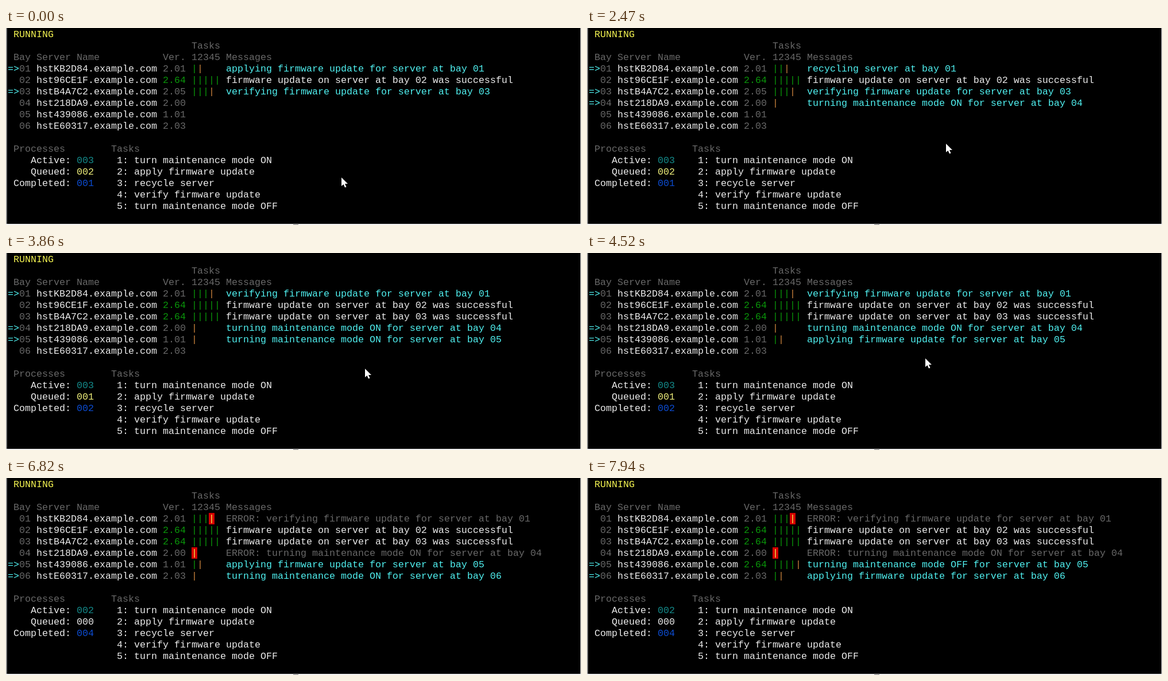
Recreate the animation shown at these times as an HTML page with a canvas. Size 1001 by 344 pixels, loop 8040 ms.

```html
<!DOCTYPE html>
<html lang="en">
<head>
<meta charset="utf-8">
<title>Firmware update monitor</title>
<style>
html, body { margin: 0; width: 100%; height: 100%; overflow: hidden; background: #000; }
canvas { display: block; }
</style>
</head>
<body>
<canvas id="screen" width="1001" height="344"></canvas>
<script>
const ctx = document.getElementById('screen').getContext('2d');
const LOOP = 8040, BLINK = 684, TICK = 130;
const GREY = '#686868', WHITE = '#ececec', CYAN = '#50f0f0', GREEN = '#0a960a',
      YELLOW = '#f2f250', ORANGE = '#c8823c', RED = '#d40000';

const tasks = ['turn maintenance mode ON', 'apply firmware update', 'recycle server',
  'verify firmware update', 'turn maintenance mode OFF'];
const doing = ['turning maintenance mode ON for', 'applying firmware update for', 'recycling',
  'verifying firmware update for', 'turning maintenance mode OFF for'];
const DONE = tasks.length + 1;

// first: stage at the start (0 = waiting); steps: when each next stage begins; fails: when it breaks
const servers = [
  { name: 'hstKB2D84', version: '2.01', first: 2, steps: [1910, 2880], fails: 6820 },
  { name: 'hst96CE1F', version: '2.03', first: DONE, steps: [] },
  { name: 'hstB4A7C2', version: '2.05', first: 4, steps: [3020, 3860] },
  { name: 'hst218DA9', version: '2.00', first: 0, steps: [2470], fails: 6550 },
  { name: 'hst439086', version: '1.01', first: 0, steps: [3860, 4000, 6940, 7530, 7790] },
  { name: 'hstE60317', version: '2.03', first: 0, steps: [6550, 7660] }
];

const pointerMoves = [
  { at: 0, lasts: 390, x: 604, y: 185 },
  { at: 650, lasts: 260, x: 625, y: 202 },
  { at: 4030, lasts: 390, x: 589, y: 184 }
];
const POINTER_GONE = 6050;

const easeOut = p => 1 - (1 - p) ** 3;

function text(col, row, str, color) {
  ctx.fillStyle = color;
  ctx.fillText(str, 3 + col * 10, 16 + row * 20);
}

function rect(x, y, w, h, color) {
  ctx.fillStyle = color;
  ctx.fillRect(x, y, w, h);
}

function statusAt(server, t) {
  return {
    stage: server.first + server.steps.filter(s => s <= t).length,
    failed: t >= server.fails
  };
}

function drawServer(server, i, { stage, failed }) {
  const row = 3 + i, bay = '0' + (i + 1);
  const done = stage === DONE, updated = stage >= 5;
  if (stage && !done && !failed) text(0, row, '=>', CYAN);
  text(2, row, bay, GREY);
  text(5, row, server.name + '.example.com', WHITE);
  text(27, row, updated ? '2.64' : server.version, updated ? GREEN : GREY);
  if (!stage) return;

  for (let n = 1; n <= Math.min(stage, tasks.length); n++) {
    const broken = failed && n === stage;
    if (broken) rect(313 + n * 10, 1 + row * 20, 10, 20, RED);
    text(31 + n, row, '|', broken ? YELLOW : n === stage ? ORANGE : GREEN);
  }
  const message = done
    ? `firmware update on server at bay ${bay} was successful`
    : `${failed ? 'ERROR: ' : ''}${doing[stage - 1]} server at bay ${bay}`;
  text(38, row, message, done ? WHITE : failed ? GREY : CYAN);
}

function drawCounters(states) {
  const completed = states.filter(s => s.failed || s.stage === DONE).length;
  const queued = Math.max(0, 3 - completed);
  const active = states.length - completed - queued;
  const counters = [
    ['Active:', active, '#148a8a'],
    ['Queued:', queued, queued ? '#f0f07c' : WHITE],
    ['Completed:', completed, '#0c4cd2']
  ];
  counters.forEach(([label, value, color], i) => {
    text(11 - label.length, 11 + i, label, WHITE);
    text(12, 11 + i, '00' + value, color);
  });
}

function drawPointer(t) {
  if (t >= POINTER_GONE) return;
  const now = Math.floor(t / TICK) * TICK;
  let x = 584, y = 261;
  for (const move of pointerMoves) {
    const p = easeOut(Math.min(1, Math.max(0, (now - move.at) / move.lasts)));
    x += (move.x - x) * p;
    y += (move.y - y) * p;
  }
  ctx.save();
  ctx.translate(Math.round(x), Math.round(y));
  ctx.fillStyle = '#fff';
  ctx.fill(new Path2D('M0 0V15L3.5 12L6 17.5L8.5 16.5L6 11H11Z'));
  ctx.restore();
}

function drawEdges() {
  rect(0, 0, 1, 344, '#a0a0a0');
  rect(1, 0, 1, 344, '#6e6e6e');
  rect(1000, 0, 1, 344, '#f0f0f0');
  rect(0, 342, 1001, 2, '#f0f0f0');
  rect(500, 343, 9, 1, '#707070');
}

function draw(t) {
  const states = servers.map(s => statusAt(s, t));
  rect(0, 0, 1001, 344, '#000');
  ctx.font = '16.664px "Liberation Mono", "Courier New", monospace';

  if (Math.floor((t + 299) / BLINK) % 2 === 0) text(1, 0, 'RUNNING', YELLOW);
  text(32, 1, 'Tasks', GREY);
  text(1, 2, 'Bay Server Name', GREY);
  text(27, 2, 'Ver. 12345 Messages', GREY);
  servers.forEach((s, i) => drawServer(s, i, states[i]));

  text(1, 10, 'Processes', GREY);
  text(18, 10, 'Tasks', GREY);
  drawCounters(states);
  tasks.forEach((task, i) => text(19, 11 + i, `${i + 1}: ${task}`, WHITE));

  drawPointer(t);
  drawEdges();
}

const start = performance.now();
function frame() {
  draw((performance.now() - start) % LOOP);
  requestAnimationFrame(frame);
}
frame();
</script>
</body>
</html>
```
